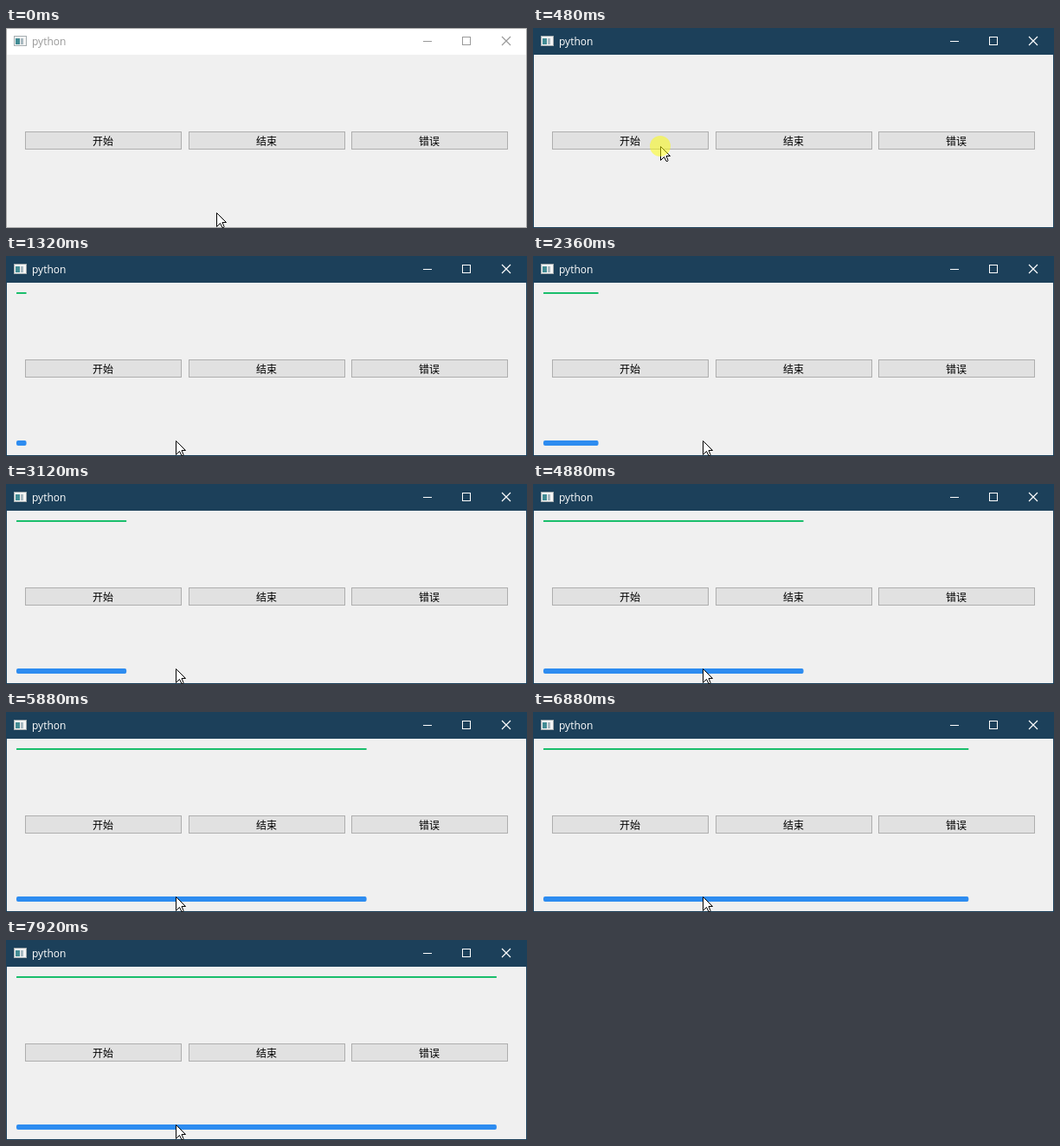
Write an HTML page that moves like this. It is 602 by 232 pixels and loops after 8 s.

```html
<!DOCTYPE html>
<html lang="zh-CN">
<head>
<meta charset="utf-8">
<title>python</title>
<style>
  html, body { margin: 0; width: 100%; height: 100%; overflow: hidden; background: #f0f0f0; }
  svg { display: block; --bar: #fff; --ink: #999; --edge: #aaa; }
  svg.active { --bar: #1c405a; --ink: #fff; --edge: #1c405a; }
  .title { font: 12px "Open Sans", sans-serif; fill: var(--ink); }
  .label { font: 500 12px "Noto Sans CJK SC", "Noto Sans CJK", sans-serif; text-anchor: middle; }
  .controls { fill: none; stroke: var(--ink); }
  .button { fill: #e1e1e1; stroke: #adadad; }
</style>
</head>
<body>
<svg id="stage" width="602" height="232" viewBox="0 0 602 232">
  <rect width="602" height="232" fill="#f0f0f0"/>
  <rect width="602" height="31" fill="var(--bar)"/>
  <rect x=".5" y=".5" width="601" height="231" fill="none" stroke="var(--edge)"/>

  <g>
    <rect x="9.5" y="9.5" width="14" height="11" fill="#f4f4f4" stroke="#a5adb0"/>
    <rect x="11" y="12" width="5" height="7" fill="#438c94"/>
    <rect x="17" y="12" width="3" height="7" fill="#a9b9c1"/>
  </g>
  <text class="title" x="30" y="20">python</text>
  <g class="controls">
    <path d="M482 15.5h10"/>
    <rect x="527.5" y="10.5" width="9" height="9"/>
    <path d="M573 10l10 10M583 10l-10 10" stroke-width="1.2"/>
  </g>

  <g id="buttons"></g>
  <g id="bars">
    <rect x="12" y="42" height="2" rx=".5" fill="#19be6b"/>
    <rect x="12" y="214" height="6" rx="2" fill="#2d8cf0"/>
  </g>

  <g id="cursor">
    <path d="M.5 .5V16.5L4.5 12.5 7 17.5H8.5L9 16.5 7 11.5H11.5Z" fill="#fff" stroke="#000"/>
    <circle id="press" r="12" fill="#ff0" fill-opacity=".5"/>
  </g>
</svg>
<script>
const LOOP = 8000, TICK = 40;
const CLICK = 480, LOAD_TIME = 8485, FULL_WIDTH = 578;
const byId = id => document.getElementById(id);
const clamp = x => Math.min(1, Math.max(0, x));
const mix = (a, b, k) => a + (b - a) * k;
const easeInOutSine = k => (1 - Math.cos(Math.PI * k)) / 2;
const easeOutSine = k => Math.sin(Math.PI * k / 2);

byId("buttons").innerHTML = ["开始", "结束", "错误"].map((text, i) => {
  const x = Math.round(22 + 188.5 * i);
  return `<rect class="button" x="${x + .5}" y="120.5" width="180" height="20"/>
    <text class="label" x="${x + 90}" y="135.5">${text}</text>`;
}).join("");

// Whole percents; the bars only show from two percent on.
function percentAt(t) {
  const percent = Math.floor(100 * easeInOutSine(clamp((t - CLICK) / LOAD_TIME)));
  return percent < 2 ? 0 : percent;
}

function cursorAt(t) {
  const arrive = easeOutSine(clamp((t - 20) / 300));
  const leave = clamp((t - CLICK - 40) / 160);
  return [
    mix(mix(243, 147, arrive), 196, leave),
    mix(mix(214, 137, arrive), 214, leave)
  ];
}

function draw(now) {
  const t = Math.floor(now % LOOP / TICK) * TICK;
  byId("stage").classList.toggle("active", t >= CLICK);

  const width = FULL_WIDTH * percentAt(t) / 100;
  for (const bar of byId("bars").children) bar.setAttribute("width", width);

  const [x, y] = cursorAt(t).map(Math.round);
  byId("cursor").setAttribute("transform", `translate(${x} ${y})`);
  byId("press").style.display = t >= CLICK && t < CLICK + 80 ? "" : "none";
}

const origin = performance.now();
function frame() {
  draw(performance.now() - origin);
  requestAnimationFrame(frame);
}
frame();
</script>
</body>
</html>
```
